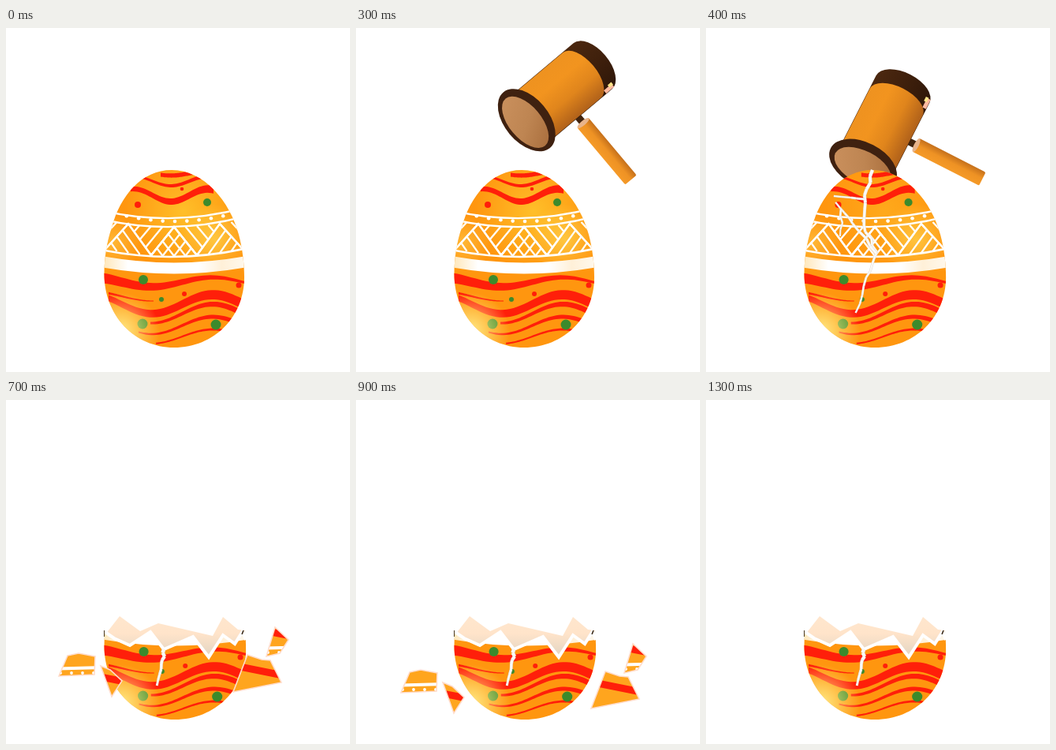
Write an HTML page with a canvas that moves like this. It is 436x436 px and loops after 3.3 s.

```html
<!DOCTYPE html>
<html lang="en">
<head>
<meta charset="utf-8">
<title>Cracking egg</title>
<style>
html, body { margin: 0; width: 100%; height: 100%; overflow: hidden; background: #fff; }
canvas { display: block; width: 100%; height: 100%; }
</style>
</head>
<body>
<canvas id="stage" width="436" height="436"></canvas>
<script>
const ctx = document.getElementById('stage').getContext('2d');
const LOOP = 3300;
const RED = '#ff1f0a', GREEN = '#3c8a2c';

const lerp = (a, b, t) => a + (b - a) * t;
const mix = (p, q, t) => [lerp(p[0], q[0], t), lerp(p[1], q[1], t)];
const noise = i => Math.abs(Math.sin(i * 127.1) * 43758.5) % 1 - .5;

const egg = new Path2D('M210 180C251 180 284 220 295 262C300 281 302 299 302 316C302 366 264 405 213 405C163 405 124.500 364 124.500 312C124.500 291 128 271 134 253C145 212 172 180 210 180Z');

// Key points of the broken edge, and of the far wall behind it
const rim = [[124, 293], [137, 302], [157, 311], [183, 294], [200, 316], [237, 300], [257, 326], [275, 298], [290, 309], [300, 293], [304, 304]];
const wall = [[126, 297], [144, 274], [170, 293], [193, 283], [262, 299], [275, 275], [294, 291], [303, 292]];

const shards = [
  { pts: [[68, 345], [82, 342], [103, 346], [102, 369], [57, 371]], stripe: 361 },
  { pts: [[110, 358], [122, 363], [137, 377], [124, 397]], streak: 374 },
  { pts: [[316, 344], [334, 350], [345, 351], [359, 379], [298, 391]], streak: 363 },
  { pts: [[351, 309], [368, 325], [357, 342], [340, 346]], streak: 318, stripe: 335 }
];

function trace(pts, close) {
  ctx.beginPath();
  pts.forEach(([x, y]) => ctx.lineTo(x, y));
  if (close) ctx.closePath();
}

function line(pts, color, width) {
  trace(pts);
  ctx.strokeStyle = color;
  ctx.lineWidth = width;
  ctx.stroke();
}

function oval(x, y, rx, ry, color) {
  ctx.fillStyle = color;
  ctx.beginPath();
  ctx.ellipse(x, y, rx, ry, 0, 0, 7);
  ctx.fill();
}

const dot = (x, y, r, color) => oval(x, y, r, r, color);

function gradient(g, ...stops) {
  stops.forEach((c, i) => g.addColorStop(i / (stops.length - 1), c));
  return g;
}

function glow(x, y, r, rgb, alpha) {
  ctx.fillStyle = gradient(ctx.createRadialGradient(x, y, 0, x, y, r), `rgba(${rgb},${alpha})`, `rgba(${rgb},${alpha / 2})`, `rgba(${rgb},0)`);
  ctx.fillRect(x - r, y - r, 2 * r, 2 * r);
}

// Tapered cosine ribbon, lowest at x = crest
function ribbon(x0, x1, mid, amp, w0, w1, crest = 185, half = 77) {
  const top = [], bottom = [];
  for (let i = 0; i <= 40; i++) {
    const t = i / 40, x = lerp(x0, x1, t);
    const y = mid + amp * Math.cos((x - crest) / half * Math.PI);
    const h = lerp(w0, w1, t) / 2;
    top.push([x, y - h]);
    bottom.unshift([x, y + h]);
  }
  trace([...top, ...bottom], true);
  ctx.fillStyle = RED;
  ctx.fill();
}

function band(left, mid, right, width, color = '#fff') {
  ctx.beginPath();
  ctx.moveTo(120, left);
  ctx.quadraticCurveTo(213, 2 * mid - (left + right) / 2, 306, right);
  ctx.strokeStyle = color;
  ctx.lineWidth = width;
  ctx.stroke();
}

// Triangles hatched parallel to one side, mirrored about the middle and bent along the egg
function lattice() {
  for (const side of [-1, 1]) {
    const bend = ([x, y]) => [213 + side * x, y - 10 * (x / 93) ** 2];
    const stroke = (...p) => line(p.map(bend), '#fff', 2.3);
    for (let k = 0; k <= 3; k++) {
      const x = 29 * k, tip = k % 2 ? 289 : 252, base = 541 - tip;
      const a = [x, tip], b = [x - 29, base], c = [x + 29, base];
      stroke(b, a, c);
      for (let t = .25; t < 1; t += .25) stroke(mix(b, c, t), mix(a, c, t));
    }
  }
}

function drawEgg(cracked) {
  ctx.save();
  if (cracked) {
    ctx.translate(124, 0);
    ctx.scale(1.012, 1);
    ctx.translate(-124, 0);
  }
  ctx.clip(egg);
  ctx.fillStyle = '#ff960f';
  ctx.fillRect(120, 175, 190, 235);
  glow(225, 232, 75, '255,205,50', cracked ? .35 : .75);
  glow(265, 268, 45, '255,222,90', .6);
  glow(135, 272, 35, '255,215,90', .5);

  ribbon(196, 246, 184, 3, 5, 6, 209, 47);
  ribbon(168, 248, 194, 6, 3, 5, 209, 47);
  ribbon(158, 263, 212, 8, 6, 10, 209, 47);
  ribbon(124, 304, 322, 6, 13, 3);
  ribbon(130, 187, 340, 6, 3, 1);
  ribbon(130, 304, 350, 12, 8, 13);
  ribbon(183, 304, 362, 12, 3, 8);
  ribbon(168, 295, 377, 11, 2, 6);
  ribbon(190, 275, 391, 9, 2, 3);
  for (const [x, y, r] of [[255, 221, 5], [174, 319, 6], [173, 375, 6.5], [266, 376, 6.5], [197, 344, 3]]) dot(x, y, r, GREEN);
  for (const [x, y, r] of [[167, 224, 4], [223, 204, 2.3], [295, 326, 3.5], [226, 337, 3], [139, 345, 2]]) dot(x, y, r, RED);

  band(231, 241, 227, 2.4);
  band(242, 252, 238, 2.4);
  for (let i = -4; i <= 4; i++) dot(214 + i * 15.3, 245 - i * i * .42, 2.3, '#fff');
  lattice();
  band(281, 290, 279, 2.6);
  band(296, 304.500, 296, 14, gradient(ctx.createLinearGradient(125, 0, 303, 0), '#ffe8bc', '#fff', '#fff', '#fff', '#fff', '#fff0d8', '#fff8ec'));
  glow(145, 385, 50, '255,240,140', .95);
  ctx.restore();
}

// Jagged line through key points, thinning towards its end
function crack(width, ...keys) {
  const pts = [keys[0]];
  keys.slice(1).forEach((p, i) => {
    for (let j = 1; j <= 4; j++) {
      const [x, y] = mix(keys[i], p, j / 4);
      pts.push([x + 5 * noise(pts.length), y]);
    }
  });
  pts.slice(1).forEach((p, i) => {
    const w = width * (1 - .6 * i / pts.length);
    line([pts[i], p], '#dcd8d4', w + .9);
    line([pts[i], p], '#fbfaf8', w);
  });
}

function drawCracks() {
  crack(3.6, [211, 180], [203, 212], [199, 250], [216, 284], [203, 316], [191, 361]);
  crack(3, [216, 286], [188, 248], [163, 221]);
  crack(2.2, [201, 217], [164, 213]);
  crack(2, [171, 230], [172, 264]);
}

// Local frame: origin at the striking face, x along the barrel
function drawHammer(t) {
  ctx.save();
  ctx.translate(lerp(346.8, 349, t), lerp(191.2, 189.5, t));
  ctx.rotate(lerp(-17, -63, t) * Math.PI / 180);
  ctx.translate(-53.5, -141);

  const barrel = (length, rx, ry, ...colors) => {
    ctx.fillStyle = gradient(ctx.createLinearGradient(0, -ry, 0, ry), ...colors);
    ctx.beginPath();
    ctx.moveTo(0, 1.5 - ry);
    ctx.ellipse(length, 1.5, rx, ry, 0, -Math.PI / 2, Math.PI / 2);
    ctx.lineTo(0, 1.5 + ry);
    ctx.fill();
  };

  ctx.fillStyle = '#43250f';
  ctx.fillRect(48, 35, 9, 14);
  ctx.fillStyle = gradient(ctx.createLinearGradient(43, 0, 63, 0), '#f59a28', '#ee9224', '#c06c1a');
  ctx.beginPath();
  ctx.roundRect(43, 48, 19, 95, 2);
  ctx.fill();
  oval(52.5, 49, 9.5, 3, '#e9b48a');

  barrel(108, 21, 38, '#4c2810', '#3f200c', '#2f1709');
  barrel(90, 19, 37.5, '#ee9220', '#f2941f', '#e0851c', '#b3631a');
  ctx.fillStyle = '#ffb9a0';
  ctx.fillRect(99, 34, 13, 5);
  ctx.fillStyle = '#ffe58a';
  ctx.fillRect(107, 32, 6, 4);
  oval(0, 0, 28, 46, '#3f2110');
  oval(-3, 1, 20.5, 39, gradient(ctx.createLinearGradient(-20, -30, 20, 35), '#c98f5c', '#be8552', '#a86d3c'));
  ctx.restore();
}

function drawShell() {
  trace([...wall, [302, 326], [126, 326]], true);
  ctx.fillStyle = gradient(ctx.createLinearGradient(0, 274, 0, 318), '#ffe6cd', '#ffe4ca', '#e9d8c4');
  ctx.fill();
  ctx.save();
  trace([...rim, [310, 410], [118, 410]], true);
  ctx.clip();
  drawEgg(true);
  ctx.restore();
  line(rim, '#fff', 4);
  crack(4, [200, 316], [199, 334], [190, 362]);
  line([[124.5, 292], [124.5, 300]], '#4a3a20', 1);
  line([[301, 292], [299, 297]], '#33220f', 1.5);
}

function drawShard({ pts, streak, stripe }, lift) {
  const [x] = pts[0];
  ctx.save();
  ctx.translate(lift * Math.sign(213 - x) * 10, -lift * 21);
  trace(pts, true);
  ctx.save();
  ctx.clip();
  ctx.fillStyle = '#ffa51e';
  ctx.fillRect(50, 300, 330, 100);
  if (streak) line([[x - 30, streak - 8], [x + 50, streak + 8]], RED, 9);
  if (stripe) {
    line([[x - 30, stripe + 1], [x + 40, stripe - 1]], '#fff', 4);
    for (let i = -1; i < 3; i++) dot(x + 5 + i * 14, stripe + 6, 1.9, '#fff');
  }
  ctx.restore();
  trace(pts, true);
  ctx.strokeStyle = '#ffdccb';
  ctx.lineWidth = 1.6;
  ctx.stroke();
  ctx.restore();
}

function draw(ms) {
  ctx.fillStyle = '#fff';
  ctx.fillRect(0, 0, 436, 436);
  if (ms < 700) {
    if (ms >= 200 && ms < 600) drawHammer(Math.min(2, Math.floor((ms - 200) / 100)) / 2);
    drawEgg(ms >= 400);
    if (ms >= 400) drawCracks();
    return;
  }
  drawShell();
  if (ms >= 1300) return;
  ctx.globalAlpha = ms < 1100 ? 1 : .5;
  shards.forEach(s => drawShard(s, ms < 900 ? 1 : 0));
  ctx.globalAlpha = 1;
}

const start = performance.now();
function tick() {
  draw((performance.now() - start) % LOOP);
  requestAnimationFrame(tick);
}
tick();
</script>
</body>
</html>
```
